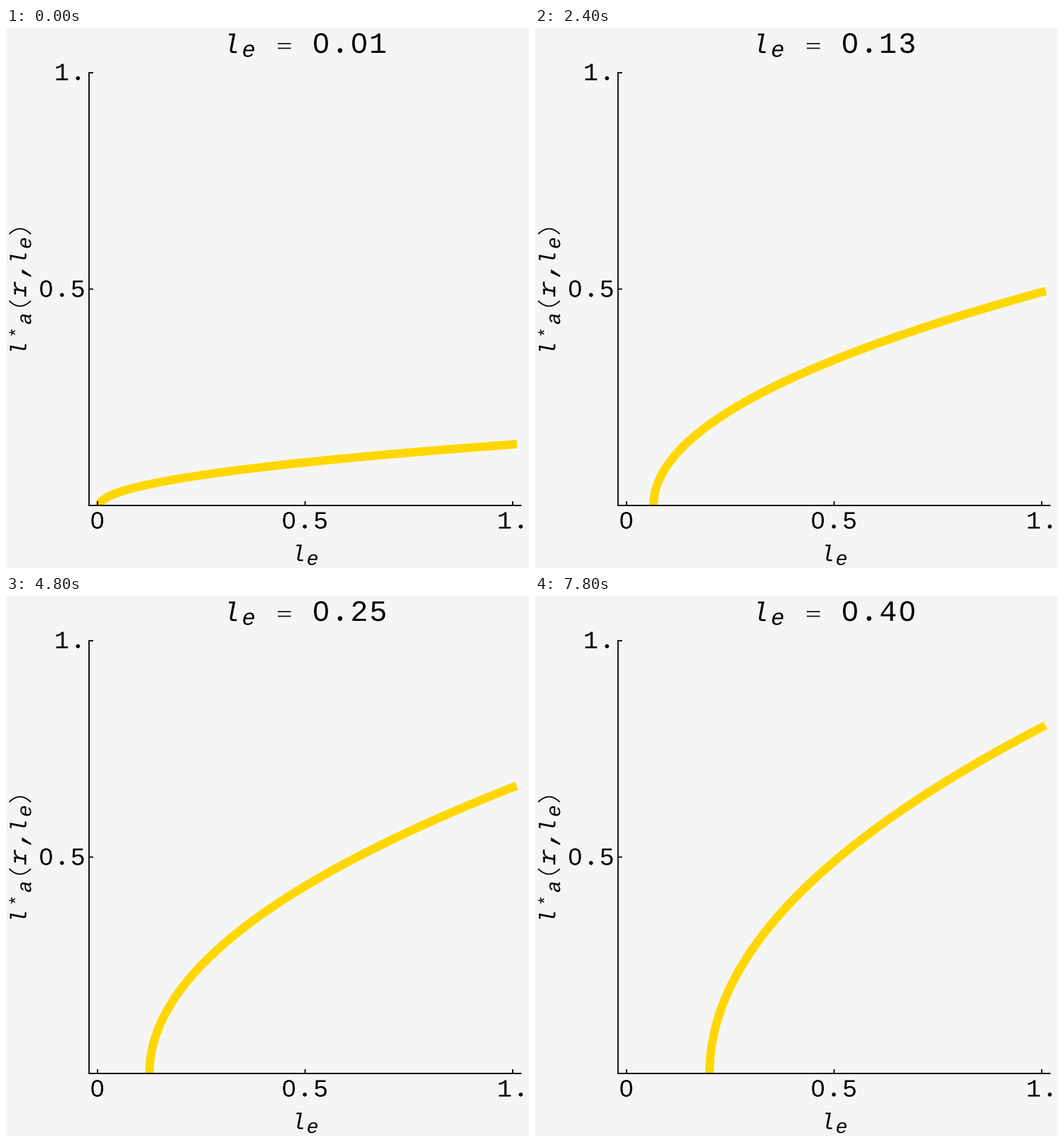
A matplotlib script for the animation above (8 s loop, 737 px wide and 760 px high).

```python
import numpy as np
import matplotlib.pyplot as plt
from matplotlib.animation import FuncAnimation
from matplotlib.patches import PathPatch, Rectangle
from matplotlib.path import Path
from matplotlib.textpath import TextPath

W, H, DPI = 737, 760, 64
PX = 72 / DPI                      # points per pixel
FRAMES, INTERVAL = 40, 200
X0, X1 = 129, 714                  # pixels of x = 0 and x = 1
Y0, Y1 = 672, 63                   # pixels of y = 0 and y = 1
LEFT, RIGHT = 117, 726.5

fig = plt.figure(figsize=(W / DPI, H / DPI), dpi=DPI, facecolor="#f5f5f5")
ax = fig.add_axes([0, 0, 1, 1])
ax.set_xlim(0, W)
ax.set_ylim(H, 0)
ax.axis("off")


def open_zero(path):
    """Remove the dot inside a monospaced zero."""
    starts = np.flatnonzero(path.codes == Path.MOVETO)
    verts = np.split(path.vertices, starts[1:])
    codes = np.split(path.codes, starts[1:])
    parts = [Path(v, c) for v, c in zip(verts, codes)]
    parts.sort(key=lambda p: p.get_extents().height, reverse=True)
    return Path.make_compound_path(*parts[:2])


def glyph(char, size, italic=False):
    """Outline centred on u = 0, standing on v = 0."""
    if char == ".":
        r = 0.08 * size
        return Path.circle((0, r), r)
    prop = {"family": "Liberation Mono", "style": "italic" if italic else "normal"}
    path = TextPath((0, 0), char, size=size, prop=prop)
    if char == "0":
        path = open_zero(path)
    box = path.get_extents()
    return Path(path.vertices - [(box.x0 + box.x1) / 2, 0], path.codes)


def text_path(text, x, y, size, step=0, italic=False, up=False):
    """x, y: middle of the first glyph on the baseline."""
    parts = []
    for i, char in enumerate(text):
        g = glyph(char, size, italic)
        u, v = g.vertices.T
        u = u + i * step
        verts = np.column_stack([x - v, y - u] if up else [x + u, y - v])
        parts.append(Path(verts, g.codes))
    return Path.make_compound_path(*parts)


def write(text, x, y, size, step=0, italic=False, up=False):
    path = text_path(text, x, y, size, step, italic, up)
    return ax.add_patch(PathPatch(path, fc="black", lw=0))


def line(xs, ys, width=1.8):
    ax.plot(xs, ys, color="black", lw=width * PX, solid_capstyle="butt",
            snap=False, zorder=4)


def paren(y_end, y_mid):
    path = Path([(4.5, y_end), (19.7, 2 * y_mid - y_end), (35, y_end)],
                [Path.MOVETO, Path.CURVE3, Path.CURVE3])
    ax.add_patch(PathPatch(path, fc="none", ec="black", lw=1.8 * PX))


# axes and ticks
line([LEFT, LEFT], [Y1 - 0.9, Y0 + 0.9])
line([LEFT, RIGHT], [Y0, Y0])
for x in (X0, (X0 + X1) / 2, X1):
    line([x, x], [Y0 - 6, Y0])
for y in (Y1, (Y0 + Y1) / 2):
    line([LEFT, LEFT + 6], [y, y])

# tick labels
write("0", 128.7, 704.5, 35)
write("0.5", 398.7, 704.5, 35, 22.4)
write("1.", 703, 704.5, 35, 22.4)
write("1.", 79, 73.5, 35, 22.4)
write("0.5", 56.5, 378.5, 35, 22.4)

# horizontal axis name
write("l", 414, 750.3, 32, italic=True)
write("e", 432, 755.7, 28, italic=True)

# vertical axis name, bottom to top
write("l", 28.7, 449.7, 32, italic=True, up=True)
write("*", 22.5, 428.5, 25, up=True)
write("a", 35.3, 409.7, 28, italic=True, up=True)
paren(384, 391.5)
write("r", 28.3, 364.5, 32, italic=True, up=True)
line([27.2, 27.2], [364, 378], 2.5)
line([12.8, 12.8], [368, 375], 2.5)
write(",", 28.3, 345, 40, italic=True, up=True)
write("l", 28.7, 322, 32, italic=True, up=True)
write("e", 35.3, 302.7, 28, italic=True, up=True)
paren(290, 282.5)

# heading
write("l", 319.7, 35.3, 38, italic=True)
write("e", 342, 40.5, 32, italic=True)
for y in (22, 28.5):
    line([383, 401.5], [y, y], 1.6)
heading = dict(x=443.9, y=35, size=41.5, step=26.9)
value = write("0.01", **heading)

curve, = ax.plot([], [], color="#ffd700", lw=12 * PX, zorder=2,
                 solid_capstyle="projecting", solid_joinstyle="round")
curve.set_clip_path(Rectangle((LEFT, Y1), RIGHT - LEFT, Y0 - Y1,
                              transform=ax.transData))
s = np.linspace(0, 1, 300) ** 2


def draw(i):
    le = 0.01 * (i + 1)
    x = le / 2 + (1 - le / 2) * s
    y = np.sqrt(np.maximum(le * (2 * x - le), 0))
    curve.set_data(X0 + (X1 - X0) * x, Y0 + (Y1 - Y0) * y)
    value.set_path(text_path(f"{le:.2f}", **heading))
    return curve, value


anim = FuncAnimation(fig, draw, frames=FRAMES, interval=INTERVAL,
                     repeat=True, repeat_delay=0, blit=False)
plt.show()
```
